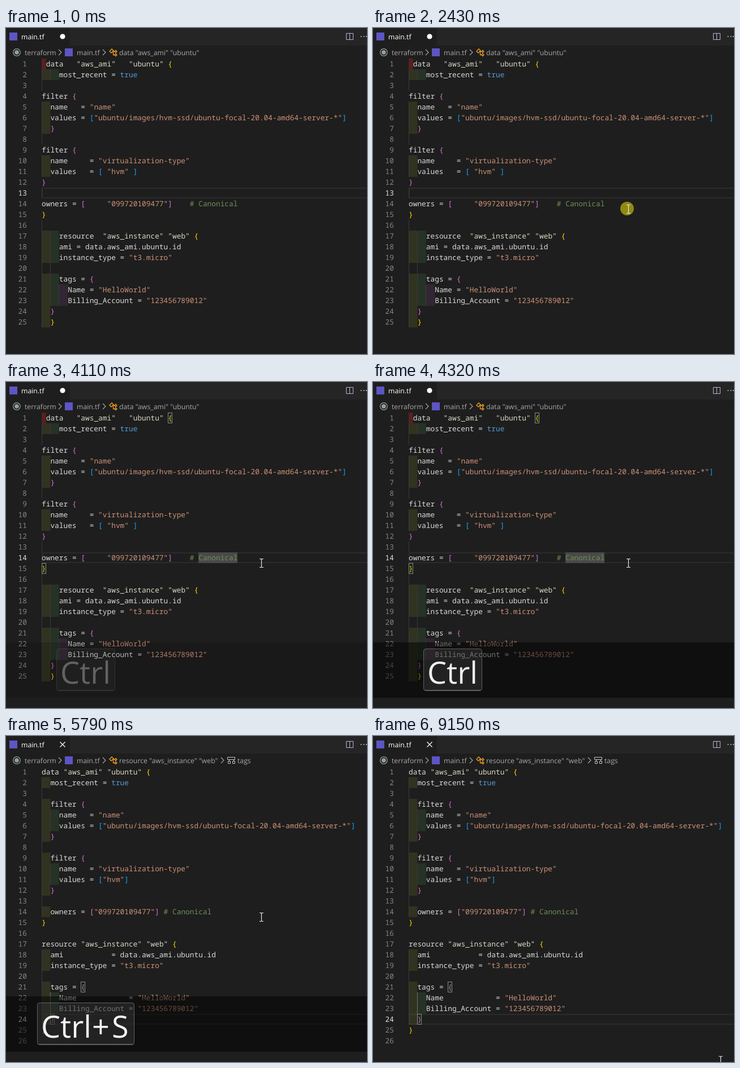
These frames come from a looping animation (638x576 px, 9220 ms). An HTML page:

```html
<!DOCTYPE html>
<html lang="en">
<head>
<meta charset="utf-8">
<title>main.tf</title>
<style>
html, body { margin: 0; width: 100%; height: 100%; overflow: hidden; background: #1e1e1e; }
svg { display: block; }
text { white-space: pre; text-rendering: geometricPrecision; }
.code text { font: 12.83px "Noto Sans Mono", monospace; }
.ui { font: 12.25px "Open Sans", sans-serif; fill: #a9a9a9; }
.key { font: 55px "Open Sans", sans-serif; fill: #f5f5f5; }
.line { fill: none; stroke: #a9a9a9; }
.match { fill: rgba(0, 100, 0, .1); stroke: #888; }
.caret { fill: #c8c8c8; }
.cap { fill: rgba(128, 128, 128, .17); stroke: rgba(204, 204, 204, .4); }
.hidden { display: none; }
</style>
</head>
<body>
<svg id="stage" width="638" height="576" viewBox="0 0 638 576">
  <defs>
    <path id="chevron" class="line" stroke-width="1.1" d="M0 -5l5 5l-5 5"/>
    <g id="symbol" fill="none" stroke="#ee9d28" stroke-width="1.3">
      <path d="M1 4l4-4l3 3l-4 4zM6.500 4.500h3.500M7.500 4.500v6h2.500M10 4.500l2-2l2 2l-2 2zM10 10.500l2-2l2 2l-2 2z"/>
    </g>
  </defs>
  <rect width="638" height="576" fill="#1e1e1e"/>
  <rect x="113" width="525" height="31" fill="#252526"/>
  <rect x="6" y="8" width="14" height="14" fill="#5d55c4"/>
  <text class="ui" x="27" y="20" style="fill:#fff">main.tf</text>
  <circle id="dirty" cx="100" cy="15" r="4.600" fill="#fff"/>
  <path id="close" d="M95.500 10.500l9 9M104.500 10.500l-9 9" stroke="#fff" stroke-width="1.300"/>
  <path d="M601.500 9.500h12v11h-12zM607.500 9.500v11" fill="none" stroke="#c4b0d0"/>
  <g fill="#c5c5c5"><circle cx="627.500" cy="15" r="1"/><circle cx="632.500" cy="15" r="1"/><circle cx="637" cy="15" r="1"/></g>

  <g fill="none" stroke="#93a19d" stroke-width="1.200"><circle cx="19" cy="43" r="6.300"/><circle cx="19" cy="43" r="3.200" fill="#93a19d"/></g>
  <text class="ui" x="33" y="48">terraform</text>
  <use href="#chevron" x="93" y="43"/>
  <rect x="104" y="36" width="14" height="14" fill="#5d55c4"/>
  <text class="ui" x="125" y="48">main.tf</text>
  <use href="#chevron" x="171" y="43"/>
  <use href="#symbol" x="182" y="37"/>
  <text id="crumbOld" class="ui" x="200" y="48">data "aws_ami" "ubuntu"</text>
  <g id="crumbNew">
    <text class="ui" x="200" y="48">resource "aws_instance" "web"</text>
    <use href="#chevron" x="380" y="43"/>
    <path d="M391.500 37.500h13v4h-13zM392.500 44.500h4v4h-4zM400.500 44.500h4v4h-4zM394.500 41.500v3M402.500 41.500v3" fill="none" stroke="#c5c5c5"/>
    <text class="ui" x="409" y="48">tags</text>
  </g>

  <rect id="current" x="64" width="590" height="17" fill="none" stroke="#2b2b2b" stroke-width="2"/>
  <rect id="word" x="340" y="301" width="69" height="19" fill="#494949"/>
  <g id="before" class="code"></g>
  <g id="after" class="code"></g>
  <g id="matchOld" class="match"><rect x="286.500" y="54.500" width="7" height="18"/><rect x="63.500" y="320.500" width="7" height="18"/></g>
  <g id="matchNew" class="match">
    <path d="M78.500 453v38" stroke="#707070"/>
    <rect x="132.500" y="434.500" width="7" height="18"/><rect x="78.500" y="491.500" width="7" height="18"/>
  </g>
  <g id="numbers" class="code"></g>
  <rect id="caretOld" class="caret" x="408" y="301" width="2" height="19"/>
  <rect id="caretNew" class="caret" x="85" y="491" width="2" height="19"/>

  <g id="overlay">
    <rect y="460" width="638" height="98" fill="#000" fill-opacity=".5"/>
    <g id="ctrl">
      <rect class="cap" x="89.500" y="471.500" width="103" height="74" rx="4"/>
      <path d="M92 544.500h98" stroke="#bbb" stroke-opacity=".4"/>
      <text class="key" x="96" y="533" style="font-size:54px">Ctrl</text>
    </g>
    <g id="ctrlS">
      <rect class="cap" x="55.500" y="471.500" width="171" height="74" rx="4"/>
      <path d="M58 544.500h166" stroke="#bbb" stroke-opacity=".4"/>
      <text class="key" x="62" y="533" style="font-size:54px">Ctrl<tspan x="152">+</tspan><tspan x="187">S</tspan></text>
    </g>
  </g>
  <circle id="click" cx="449" cy="319" r="12" fill="#8f8a12"/>
  <path id="mouse" d="M-3.500 -7.500h2.500l1 1l1 -1h2.500M0 -6.500v13M-3.500 7.500h2.500l1 -1l1 1h2.500" fill="none" stroke="#e6e6e6" stroke-width="1.200"/>
</svg>
<script>
const LOOP = 9220, COL = 7.7, LEFT = 63, TOP = 54, ROW = 19;
const $ = id => document.getElementById(id);

const messy = ` data   "aws_ami"   "ubuntu" {
    most_recent = true

filter {
  name   = "name"
  values = ["ubuntu/images/hvm-ssd/ubuntu-focal-20.04-amd64-server-*"]
  }

filter {
  name     = "virtualization-type"
  values   = [ "hvm" ]
}

owners = [     "099720109477"]    # Canonical
}

    resource  "aws_instance" "web" {
    ami = data.aws_ami.ubuntu.id
    instance_type = "t3.micro"

    tags = {
      Name = "HelloWorld"
      Billing_Account = "123456789012"
  }
  }`;

const tidy = `data "aws_ami" "ubuntu" {
  most_recent = true

  filter {
    name   = "name"
    values = ["ubuntu/images/hvm-ssd/ubuntu-focal-20.04-amd64-server-*"]
  }

  filter {
    name   = "virtualization-type"
    values = ["hvm"]
  }

  owners = ["099720109477"] # Canonical
}

resource "aws_instance" "web" {
  ami           = data.aws_ami.ubuntu.id
  instance_type = "t3.micro"

  tags = {
    Name            = "HelloWorld"
    Billing_Account = "123456789012"
  }
}
`;

function add(parent, tag, attrs, text) {
  const el = document.createElementNS("http://www.w3.org/2000/svg", tag);
  for (const k in attrs) el.setAttribute(k, attrs[k]);
  if (text) el.textContent = text;
  parent.append(el);
  return el;
}

const bracketColors = ["#ffd700", "#da70d6", "#179fff"];
const indentColors = ["rgba(255,255,64,.09)", "rgba(127,255,127,.09)", "rgba(255,127,255,.09)"];

// blankGuides: indent guide count on blank lines where it is not one
function drawCode(group, source, blankGuides) {
  let depth = 0;
  source.split("\n").forEach((line, i) => {
    const y = TOP + i * ROW;
    const indent = line.search(/\S/);
    const guides = indent < 0 ? blankGuides[i + 1] ?? 1 : Math.floor(indent / 2);
    if (indent === 1) add(group, "rect", { x: LEFT, y, width: COL, height: ROW, fill: "rgba(128,32,32,.6)" });
    for (let g = 0; g < guides; g++) {
      const x = LEFT + g * 2 * COL;
      if (indent > 0) add(group, "rect", { x, y, width: 2 * COL, height: ROW, fill: indentColors[g] });
      add(group, "rect", { x: Math.floor(x), y, width: 1, height: ROW, fill: "#3a3a3a" });
    }
    const header = /^\s*(data|resource) /.test(line);
    for (const m of line.matchAll(/"[^"]*"|#.*|[{}[\]]|[^\s"#{}[\]]+/g)) {
      const s = m[0];
      let fill = "#dadada";
      if (s[0] === '"') fill = header ? "#d8d8c4" : "#ce9178";
      else if (s[0] === "#") fill = "#6f8f55";
      else if (s === "true") fill = "#569cd6";
      else if (/[{[]/.test(s)) fill = bracketColors[depth++];
      else if (/[}\]]/.test(s)) fill = bracketColors[--depth];
      add(group, "text", { x: LEFT + m.index * COL, y: y + 14, fill }, s);
    }
  });
}

drawCode($("before"), messy, { 20: 2 });
drawCode($("after"), tidy, { 16: 0, 26: 0 });
const numbers = Array.from({ length: 26 }, (_, i) =>
  add($("numbers"), "text", { x: 37, y: TOP + i * ROW + 14, "text-anchor": "end" }, String(i + 1)));

const CLICK = 2510, FORMAT = 5250;
const visible = {
  dirty: [[0, 5320]],
  close: [[5320, LOOP]],
  crumbOld: [[0, 5720]],
  crumbNew: [[5720, LOOP]],
  before: [[0, FORMAT]],
  after: [[FORMAT, LOOP]],
  word: [[2780, FORMAT]],
  matchOld: [[CLICK, FORMAT]],
  matchNew: [[5390, LOOP]],
  caretOld: [[CLICK, 3050], [3580, 4040], [4520, 5050]],
  caretNew: [[FORMAT, 5790], [6280, 6740], [7270, 7740], [8270, 8750]],
  overlay: [[4030, 5990]],
  ctrl: [[4030, 5120]],
  ctrlS: [[5120, 5990]],
  click: [[2430, 2650]],
  mouse: [[1210, LOOP]]
};

const ramp = (t, a, b) => Math.min(1, Math.max(0, (t - a) / (b - a)));
const smooth = p => p * p * (3 - 2 * p);

function render(t) {
  for (const id in visible)
    $(id).classList.toggle("hidden", !visible[id].some(([a, b]) => t >= a && t < b));

  const active = t < CLICK ? 13 : t < FORMAT ? 14 : 24;
  $("current").setAttribute("y", TOP + (active - 1) * ROW + 1);
  numbers.forEach((el, i) => el.setAttribute("fill", i + 1 === active ? "#e0e0e0" : "#858585"));
  numbers[25].classList.toggle("hidden", t < FORMAT);

  $("overlay").setAttribute("opacity", ramp(t, 4010, 4330));

  // The pointer comes in from the lower right and leaves the same way.
  const away = t < 5000 ? 1 - smooth(ramp(t, 1150, 2100)) : smooth(ramp(t, 8480, 9150));
  $("mouse").setAttribute("transform", `translate(${451.5 + 163 * away} ${320 + 253.5 * away})`);
}

const start = performance.now();
function tick() {
  render((performance.now() - start) % LOOP);
  requestAnimationFrame(tick);
}
tick();
</script>
</body>
</html>
```
